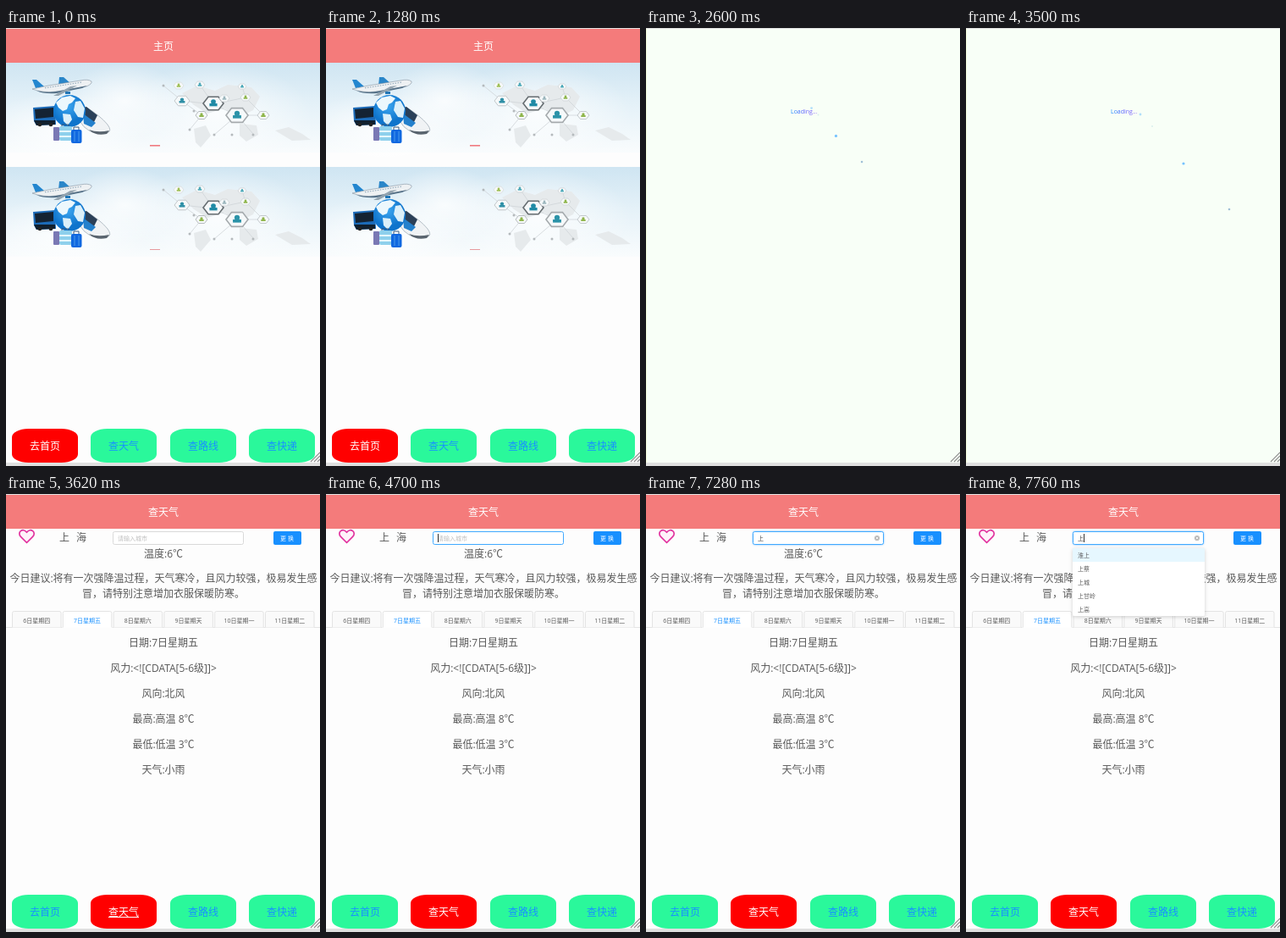
An HTML page that plays this animation: 371 by 517 pixels, repeating every 8 s.

```html
<!DOCTYPE html>
<html lang="zh-CN">
<head>
<meta charset="utf-8">
<style>
html, body { margin: 0; width: 100%; height: 100%; overflow: hidden; background: #fdfdfd; }
svg { display: block; }
text { font-family: "Open Sans", "Noto Sans CJK SC", "Noto Sans CJK", sans-serif; font-size: 12px; fill: #595959; white-space: pre; }
.s { font-size: 7px; }
.mid { text-anchor: middle; }
</style>
</head>
<body>
<svg width="371" height="517" viewBox="0 0 371 517">
  <defs>
    <linearGradient id="sky" x1="0" y1="0" x2="0" y2="1">
      <stop offset="0" stop-color="#cfe5f2"/><stop offset=".45" stop-color="#e4f1f8"/><stop offset="1" stop-color="#f9fcfd"/>
    </linearGradient>
    <radialGradient id="cloud"><stop offset="0" stop-color="#fff" stop-opacity=".8"/><stop offset="1" stop-color="#fff" stop-opacity="0"/></radialGradient>
    <radialGradient id="ocean" cx=".45" cy=".35"><stop offset="0" stop-color="#3ba6f0"/><stop offset="1" stop-color="#0f74cc"/></radialGradient>
    <linearGradient id="tip"><stop offset="0" stop-color="#1890ff"/><stop offset=".5" stop-color="#5a5cff"/><stop offset="1" stop-color="#9a70f5"/></linearGradient>
    <filter id="soft" x="-10%" y="-10%" width="120%" height="125%"><feDropShadow dx="0" dy="1" stdDeviation="2" flood-opacity=".18"/></filter>
    <g id="banner">
      <rect width="371" height="106" fill="url(#sky)"/>
      <ellipse cx="140" cy="45" rx="70" ry="45" fill="url(#cloud)"/>
      <ellipse cx="70" cy="80" rx="100" ry="45" fill="url(#cloud)"/>
      <ellipse cx="250" cy="60" rx="110" ry="60" fill="url(#cloud)"/>
      <g fill="#e6eaec">
        <path d="M208 36L226 27 247 33 262 26 290 29 300 40 292 56 276 64 258 54 238 60 222 50Z"/>
        <path d="M222 78L236 74 242 86 230 100 224 94Z"/>
        <path d="M318 80L334 76 350 84 360 91 338 92Z"/>
        <path d="M276 72L296 74 298 85 284 93 276 86Z"/>
      </g>
      <g id="net"/>
      <!-- plane -->
      <path d="M35 30L31 20 36 20 45 28Z" fill="#2386cf"/>
      <path d="M62 27L63 17 68 17 77 25Z" fill="#2a86c9"/>
      <path d="M31 31L50 27 88 21Q97 19 101 22 102 25 95 28L60 34Q44 36 31 31Z" fill="#eef1f3" stroke="#8393a0" stroke-width=".6"/>
      <path d="M36 33Q50 36 62 33.500L96 27 90 30 60 36Q44 37 36 33Z" fill="#557188"/>
      <path d="M76 28L84 27 62 39 56 39Z" fill="#93a3af"/>
      <path d="M70 34h6v3h-6z" fill="#2276b5"/>
      <path d="M46 29.800L90 23" stroke="#5b7f9a" stroke-width=".7" stroke-dasharray="1.500 1.500"/>
      <!-- train -->
      <path d="M84 54L94 52Q112 63 120 73 126 81 119 83 106 85 98 80 91 76 88 70Z" fill="#f0f3f5" stroke="#8c9aa6" stroke-width=".6"/>
      <path d="M87 54L95 52 108 62 104 70 96 68Z" fill="#2b4058"/>
      <path d="M91 60L106 71 101 76 92 72Z" fill="#2380cc"/>
      <path d="M98 79Q108 83 122 80L119 84Q106 87 98 79Z" fill="#59646e"/>
      <!-- bus -->
      <path d="M32 53L58 51 59 73 36 74 33 69Z" fill="#1c6bb8"/>
      <path d="M34 55L56 53 56 64 35 66Z" fill="#142333"/>
      <path d="M33 68L58 68 58 73 36 74Z" fill="#10202f"/>
      <circle cx="40" cy="73" r="2.300" fill="#222"/><circle cx="53" cy="73" r="2.300" fill="#222"/>
      <!-- globe -->
      <circle cx="75" cy="57" r="19" fill="url(#ocean)"/>
      <path d="M59 47L66 41 76 39 82 42 78 47 74 49 72 55 67 57 62 53Z" fill="#ecf8fd"/>
      <path d="M82 46L88 45 93 54 91 65 85 64 80 56Z" fill="#dcf0fa"/>
      <path d="M67 60L76 61 78 67 73 74 68 69Z" fill="#dcf0fa"/>
      <!-- luggage -->
      <rect x="56" y="76" width="7" height="16" rx="1" fill="#7a78b4"/>
      <rect x="63" y="75" width="15" height="17" rx="2" fill="#8ed0ec"/>
      <path d="M63 81h15M63 87h15" stroke="#e5f7fd" stroke-width="2"/>
      <path d="M66 75v-2h8v2M80 79v-3h6v3" fill="none" stroke="#35567a"/>
      <rect x="77" y="79" width="12.500" height="16" rx="2" fill="#1068e0"/>
      <path d="M81 81v12M86 81v12" stroke="#4a9bea"/>
    </g>
  </defs>

  <g id="home">
    <rect width="371" height="517" fill="#fdfdfd"/>
    <use href="#banner" y="41"/><use href="#banner" y="164"/>
    <rect x="170" y="138" width="12" height="1.600" fill="#f07a80"/>
    <rect x="170" y="261" width="12" height="1" fill="#e79a9d"/>
  </g>

  <g id="weather">
    <rect width="371" height="517" fill="#fdfdfd"/>
    <path d="M24.5 57.5L17.4 50.4C12.500 45.500 20 39 24.500 45.300 29 39 36.500 45.500 31.600 50.400Z" fill="#fff2fa" stroke="#e2339f" stroke-width="1.7" stroke-linejoin="round"/>
    <text x="63" y="56">上</text><text x="83" y="56">海</text>
    <rect id="box" x="126.500" y="44.500" width="154" height="15" rx="2" fill="#fff"/>
    <text id="field" class="s" x="132" y="55"/>
    <path id="compose" stroke="#555" stroke-width=".8" stroke-dasharray="1 1"/>
    <g id="clear"><circle cx="273" cy="52" r="3.100" fill="#bbb"/><path d="M271.800 50.800l2.400 2.400m0-2.400l-2.400 2.400" stroke="#fff" stroke-width=".8"/></g>
    <rect id="caret" y="47" width="1" height="10" fill="#333"/>
    <rect x="316" y="44" width="33" height="16" rx="2" fill="#1890ff"/>
    <text class="s" x="324" y="55" style="fill:#fff;letter-spacing:2px">更换</text>
    <g id="report"/>
    <g id="menu">
      <rect x="126" y="64" width="156" height="80" rx="2" fill="#fff" filter="url(#soft)"/>
      <rect x="126" y="64" width="156" height="16" fill="#e6f7ff"/>
    </g>
  </g>

  <g id="chrome">
    <rect y="1" width="371" height="40" fill="#f47b7b"/>
    <text id="title" class="mid" x="186" y="26" style="fill:#fff"/>
    <g id="nav"/>
  </g>

  <g id="loading">
    <rect width="371" height="517" fill="#f8fff7"/>
    <rect y="1" width="1" height="512" fill="#f3fbdc"/>
    <text class="s" x="171" y="101" style="fill:url(#tip)">Loading...</text>
    <g id="dots"/>
  </g>

  <rect width="371" height="1" fill="#e0e0e0"/>
  <rect y="513" width="371" height="4" fill="#dfdfdf"/>
  <path d="M360 512l11-11M364 512l7-7M368 512l3-3" stroke="#8c8c8c" stroke-width="1.100"/>
</svg>
<script>
const $ = id => document.getElementById(id);

function add(parent, tag, attrs, text) {
  const el = document.createElementNS('http://www.w3.org/2000/svg', tag);
  for (const k in attrs) el.setAttribute(k, attrs[k]);
  if (text) el.textContent = text;
  parent.appendChild(el);
  return el;
}
const show = (el, on) => { el.style.display = on ? '' : 'none'; };

// Value of the last step that has begun
const at = (steps, t) => steps.reduce((v, s) => t >= s[0] ? s[1] : v, steps[0][1]);

// Banner network
function hex(x, y, r, line, width, icon) {
  const pts = [0, 1, 2, 3, 4, 5].map(i =>
    [x + r * Math.cos(i * Math.PI / 3), y + r * .75 * Math.sin(i * Math.PI / 3)].map(n => n.toFixed(1)).join());
  add($('net'), 'polygon', { points: pts.join(' '), fill: '#f6f9fa', stroke: line, 'stroke-width': width });
  add($('net'), 'circle', { cx: x, cy: y - r * .16, r: r * .24, fill: icon });
  add($('net'), 'rect', { x: x - r * .38, y, width: r * .76, height: r * .28, fill: icon });
}
add($('net'), 'path', {
  d: 'M186 27L208 45 245 49 229 26M245 49L231 62 208 45M245 49L273 62 304 62 283 41 245 49M273 62L246 85M273 62L292 84M231 62L217 79M283 41L279 28',
  fill: 'none', stroke: '#d0d5d8', 'stroke-width': .8
});
[
  [204, 27, 6, '#d8dcde', .8, '#9fbf55'], [229, 26, 6, '#ccd2d5', .8, '#4ba8b8'],
  [208, 45, 9, '#c2c7ca', 1, '#2e8fa6'], [245, 48, 12, '#666d71', 1.6, '#1f8aa5'],
  [231, 62, 7, '#b5babd', 1, '#8eb54b'], [258, 42, 6, '#d0d4d6', .8, '#9cb6bd'],
  [283, 41, 6, '#ccd2d5', .8, '#8eb54b'], [273, 62, 13, '#a5aaad', 1.6, '#2c93a8'],
  [304, 62, 7, '#c3c9cc', 1, '#8eb54b'], [279, 28, 5, '#d2d5d7', .8, '#4ba8b8']
].forEach(h => hex(...h));
[[186, 27], [217, 79], [246, 85], [292, 85], [222, 57], [267, 85]].forEach(([cx, cy]) =>
  add($('net'), 'circle', { cx, cy, r: 1.5, fill: '#b5babd' }));

// Weather report
const report = $('report');
[
  [75, '温度:6℃'],
  [104, '今日建议:将有一次强降温过程，天气寒冷，且风力较强，极易发生感'],
  [122, '冒，请特别注意增加衣服保暖防寒。'],
  [180, '日期:7日星期五'], [210, '风力:<![CDATA[5-6级]]>'], [240, '风向:北风'],
  [270, '最高:高温 8℃'], [300, '最低:低温 3℃'], [330, '天气:小雨']
].forEach(([y, s]) => add(report, 'text', { class: 'mid', x: 186, y }, s));

add(report, 'path', { d: 'M0 157.500H66.500M125.500 157.500H371', stroke: '#e4e4e4' });
['6日星期四', '7日星期五', '8日星期六', '9日星期天', '10日星期一', '11日星期二'].forEach((s, i) => {
  const x = 7.5 + i * 59.8, on = i === 1;
  add(report, 'path', {
    d: `M${x} 157.500V140.500q0-2 2-2h53.500q2 0 2 2V157.500`,
    fill: on ? '#fff' : '#fafafa', stroke: '#e4e4e4'
  });
  add(report, 'text', { class: 's mid', x: x + 28.7, y: 152, style: on ? 'fill:#1890ff' : '' }, s);
});
['淮上', '上蔡', '上城', '上甘岭', '上高'].forEach((s, i) =>
  add($('menu'), 'text', { class: 's', x: 132, y: 75 + i * 16 }, s));

// Bottom navigation
const tabs = ['去首页', '查天气', '查路线', '查快递'].map((s, i) => {
  const x = Math.round(7 + i * 93.4);
  return {
    plate: add($('nav'), 'rect', { x, y: 473, width: 78, height: 40, rx: '19.5', ry: 10 }),
    label: add($('nav'), 'text', { class: 'mid', x: x + 39, y: 498 }, s),
    line: add($('nav'), 'rect', { x: x + 21, y: 499, width: 36, height: 1, fill: '#fff' })
  };
});

const BLUE = '#1890ff';
const hover = [
  [[0, BLUE]],
  [[0, BLUE], [500, '#2295ff'], [620, '#2c9cff'], [740, '#36a3ff'], [860, '#40a9ff'], [1280, BLUE]],
  [[0, BLUE], [4040, '#30a0ff'], [4160, BLUE]],
  [[0, BLUE]]
];
const pages = [[0, 'home'], [1760, 'loading'], [3620, 'weather']];
const border = [[0, '#d9d9d9'], [4520, '#b5d5f0'], [4640, '#7fc2fa'], [4700, '#40a9ff']];
const typed = [[0, ''], [6020, 's'], [6140, 'sh'], [6260, 'sha'], [6380, 'shan'], [6440, 'shang'], [7280, '上']];
const caret = [[0, 0], [4640, 1], [5180, 0], [5720, 1], [6740, 0], [7160, 1], [7280, 0], [7760, 1]];

// Loading dots: reach along the diagonal, side offset, radius, colour, opacity
const dots = [
  [129, 0, 1.3, '#8fb4d0', .85], [75, 0, 1.6, '#6fc0ff', .95],
  [41, 3.5, 1, '#c5e2e4', .6], [27, 3.5, 1.4, '#9ed6fa', .8]
].map(([reach, side, r, fill, opacity]) => ({ reach, side, el: add($('dots'), 'circle', { r, fill, opacity }) }));

function drawDots(t) {
  const step = Math.floor((t - 2120) / 60) * 60;
  const first = step >= 0 && step < 780;
  const second = step >= 960;
  show($('dots'), first || second);
  const p = first ? step / 780 * .92 : (step - 960) / 420;
  for (const d of dots) {
    const s = d.reach * p;
    d.el.setAttribute('cx', 182 + s + (d.side ? -3 : 0) * p);
    d.el.setAttribute('cy', 85 + s - d.side * 2.857 * p);
  }
}

function drawField(t) {
  const s = at(typed, t), field = $('field'), latin = /^[a-z]+$/.test(s);
  $('box').setAttribute('stroke', at(border, t));
  $('box').style.filter = t >= 4880 ? 'drop-shadow(0 0 1px rgba(24,144,255,.55))' : '';
  field.textContent = s || '请输入城市';
  field.style.fill = s ? '#444' : '#bfbfbf';
  const end = s ? Math.round(132 + field.getComputedTextLength()) : 132;
  $('caret').setAttribute('x', end);
  show($('caret'), at(caret, t));
  show($('clear'), s);
  show($('compose'), latin);
  $('compose').setAttribute('d', `M132 56.600H${end}`);
}

function draw(now) {
  const t = now % 8000, page = at(pages, t), weather = page === 'weather';
  for (const [, id] of pages) show($(id), id === page);
  show($('chrome'), page !== 'loading');
  $('title').textContent = weather ? '查天气' : '主页';
  tabs.forEach((tab, i) => {
    const on = i === (weather ? 1 : 0);
    tab.plate.setAttribute('fill', on ? '#f00' : '#2af89b');
    tab.label.style.fill = on ? '#fff' : at(hover[i], t);
    show(tab.line, on && weather && t < 4640);
  });
  show($('menu'), weather && t >= 7580);
  if (page === 'loading') drawDots(t);
  if (weather) drawField(t);
}

function loop() {
  draw(performance.now());
  requestAnimationFrame(loop);
}
loop();
</script>
</body>
</html>
```
